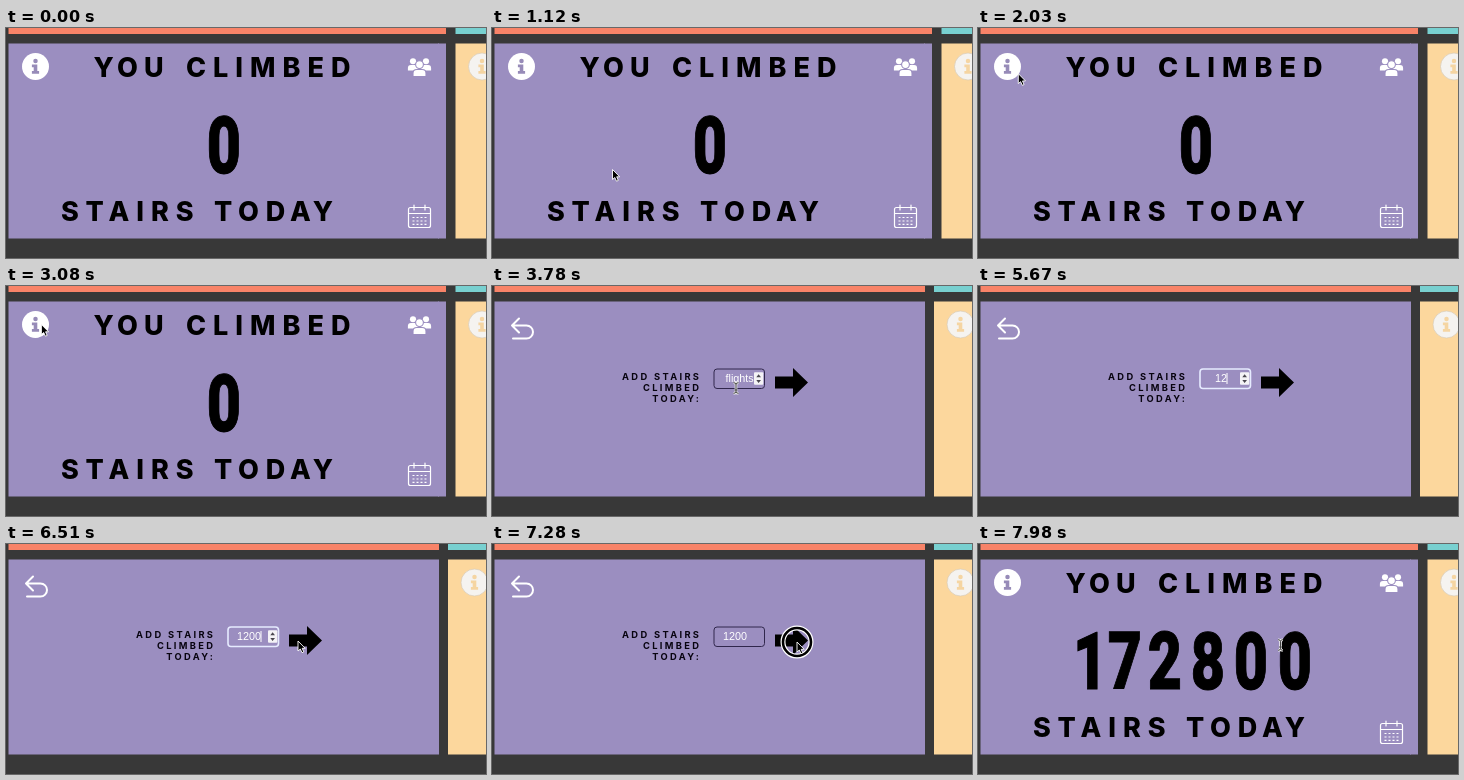
Write an HTML page that moves like this. It is 480 px wide and 230 px high and loops after 8000 ms.

```html
<!DOCTYPE html>
<html lang="en">
<head>
<meta charset="utf-8">
<title>Stair counter</title>
<style>
  html, body { margin: 0; width: 100%; height: 100%; overflow: hidden; background: #383838; }
  svg { display: block; width: 480px; height: 230px; }
  .title { font: 800 27px Inter, sans-serif; letter-spacing: 7px; }
  .label { font: 700 9.3px Inter, sans-serif; letter-spacing: 2.35px; text-anchor: end; fill: #080410; }
  .count { font: 900 80px Roboto, sans-serif; text-anchor: middle; stroke: #000; }
  .entry { font: 10.8px "Liberation Sans", Arial, sans-serif; fill: #fff; }
  .line { fill: none; stroke: #fff; stroke-width: 2; stroke-linecap: round; stroke-linejoin: round; }
</style>
</head>
<body>
<svg viewBox="0 0 480 230">
  <defs>
    <g id="info">
      <circle r="13.5"/>
      <g fill="var(--mark)" stroke="none" transform="scale(.9)">
        <circle cy="-6.2" r="2.5"/>
        <path d="M-4-2.2H2V5H4V8H-4V5H-2V.8H-4Z"/>
      </g>
    </g>
    <g id="person">
      <circle cy="-5" r="3.6"/>
      <path d="M-6 6V3Q-6-.5-2.5-.5H2.5Q6-.5 6 3V6Z"/>
    </g>
    <path id="stem" d="M-2.5-5.3Q0-5.3 0-3.5Q0-5.3 2.5-5.3M0-3.5V3.5M-2.5 5.3Q0 5.3 0 3.5Q0 5.3 2.5 5.3M-1.5 2H1.5"/>
  </defs>

  <path fill="#9b8ec0" d="M2.5 15.5H433V210.5H2.5Z"/>
  <path fill="#f88368" d="M2.5 0H433V6H2.5Z"/>
  <g id="neighbour">
    <path fill="#78d0d0" d="M442 0H490V6H442Z"/>
    <path fill="#fcd79d" d="M442 15.5H490V210.5H442Z"/>
    <use href="#info" x="468.5" y="38.5" fill="#f5f3f0" stroke="#d8cbb4" stroke-width=".7" style="--mark:#f5d5a2"/>
  </g>

  <g id="front">
    <path fill="#9b8ec0" d="M432 15.5H440V210.5H432Z"/>
    <path fill="#f88368" d="M432 0H440V6H432Z"/>
    <use href="#info" x="29.5" y="38.5" fill="#fff" style="--mark:#978bb8"/>
    <g class="title">
      <text x="87.5" y="48.5" dx="0 -2.5 -1">YOU</text><text x="180" y="48.5">CLIMBED</text>
      <text x="55" y="193.3">STAIRS</text><text x="208" y="193.3" dx="0 -.5 0 -1 -3">TODAY</text>
    </g>
    <g class="count" transform="scale(.74 1)">
      <text id="before" x="294.6" y="145">0</text>
      <text id="after" x="151.4 198.6 252.7 310.8 368.9 428.4" y="145">172800</text>
    </g>
    <g fill="#fff">
      <use href="#person" transform="translate(407 37.5) scale(.85)"/>
      <use href="#person" transform="translate(420 37.5) scale(.85)"/>
      <use href="#person" transform="translate(413.5 42) scale(1.08)" stroke="#9b8ec0"/>
    </g>
    <g class="line" style="stroke-width:1.2">
      <rect x="402.5" y="179.5" width="22" height="20" rx="2"/>
      <path d="M402.5 185.5H424.5M408 177V182M419 177V182"/>
      <path d="M406.5 189.5H421M406.5 193H421M406.5 196.3H421" stroke-dasharray="2 2" style="stroke-linecap:butt"/>
    </g>
  </g>

  <g id="back">
    <path class="line" d="M27 32.5 20 39.5 27 46.5M20 39.5H34.5A6.5 6.5 0 0 1 34.5 52.5H21"/>
    <g class="label">
      <text x="209.3" y="94.3">ADD STAIRS</text>
      <text x="209.3" y="105.2">CLIMBED</text>
      <text x="209.3" y="116">TODAY:</text>
    </g>
    <path d="M283 90.5H301V82L316 96.5 301 111V102.5H283Z"/>
    <rect id="field" x="222" y="83" width="50.5" height="19.5" rx="3" fill="none"/>
    <text id="entry" class="entry" y="96.3"></text>
    <path id="caret" stroke="#fff" d="M0 87V98"/>
    <g id="spinner">
      <rect x="262" y="86.3" width="9.3" height="12.5" rx="1" fill="#f4f3f6"/>
      <path fill="#4a4750" d="M264.3 91.3 266.6 88.3 269 91.3ZM264.3 94 266.6 97 269 94Z"/>
    </g>
  </g>

  <g id="pointer">
    <g id="ring" fill="none">
      <circle r="14" stroke="#fff" stroke-width="5"/>
      <circle r="14" stroke="#000" stroke-width="2.6"/>
    </g>
    <path id="arrow" stroke="#fff" stroke-width=".9" d="M0 0V10L2.3 8 4 11.7 5.8 10.9 4.2 7.3H7.2Z"/>
    <g id="beam" fill="none">
      <use href="#stem" stroke="#eee" stroke-width="2.6"/>
      <use href="#stem" stroke="#444"/>
    </g>
  </g>
</svg>

<script>
const LOOP = 8000, STEP = 70;
const $ = id => document.getElementById(id);
const show = (id, on) => { $(id).style.display = on ? "" : "none"; };
const within = (t, from, to) => t >= from && t < to;

// Pointer stops: time, x, y
const route = [
  [490, 190, 228], [1120, 120.5, 141.5], [1260, 94, 124], [2100, 35.4, 38.5],
  [3290, 35.4, 38.5], [3640, 242, 101], [3780, 244, 102], [4480, 247, 93.5],
  [6160, 247, 93.5], [6510, 292, 97], [6650, 292, 97], [7000, 305, 98],
  [7490, 305, 98], [7560, 302.5, 101], [LOOP, 302.5, 101]
];
const clicks = [[3150, 3290], [4550, 4760], [7140, 7350]];
const typed = [[5180, "1"], [5670, "12"], [5810, "120"], [5880, "1200"]];

function pointerAt(t) {
  const next = Math.max(1, route.findIndex(stop => stop[0] > t));
  const [t0, x0, y0] = route[next - 1], [t1, x1, y1] = route[next];
  const k = Math.max(0, (t - t0) / (t1 - t0));
  return [x0 + (x1 - x0) * k, y0 + (y1 - y0) * k];
}

function drawField(t, hovered) {
  const focused = within(t, 4620, 7210);
  const value = typed.filter(([at]) => t >= at).map(([, text]) => text).pop();
  const entry = $("entry"), field = $("field");
  entry.textContent = value || "flights";
  entry.setAttribute("x", value ? 243 : 233.5);
  entry.style.textAnchor = value ? "middle" : "start";
  field.setAttribute("stroke", focused ? "#e6ebff" : "#30274c");
  field.setAttribute("stroke-width", focused ? 1.6 : 1);
  show("spinner", focused || hovered);
  show("caret", focused);
  $("caret").setAttribute("transform", `translate(${value ? 243 + value.length * 3 : 233})`);
}

function draw(now) {
  const t = Math.floor(now % LOOP / STEP) * STEP;
  const isBack = within(t, 3290, 7350);
  const [x, y] = pointerAt(t);
  const hovered = isBack && within(x, 222, 273);
  const beam = hovered || t >= 7560;
  const click = clicks.find(([from, to]) => within(t, from, to));

  show("front", !isBack);
  show("back", isBack);
  show("before", t < 7350);
  show("after", t >= 7350);
  $("neighbour").setAttribute("transform", `translate(${isBack ? 0 : 7.5})`);
  if (isBack) drawField(t, hovered);

  show("pointer", t >= 490 && !within(t, 5180, 6160));
  $("pointer").setAttribute("transform", `translate(${x} ${y})`);
  show("arrow", !beam);
  show("beam", beam);
  show("ring", click);
  if (click) $("ring").setAttribute("transform", `scale(${t < click[0] + STEP ? 0.8 : 1})`);
  requestAnimationFrame(draw);
}
requestAnimationFrame(draw);
</script>
</body>
</html>
```
